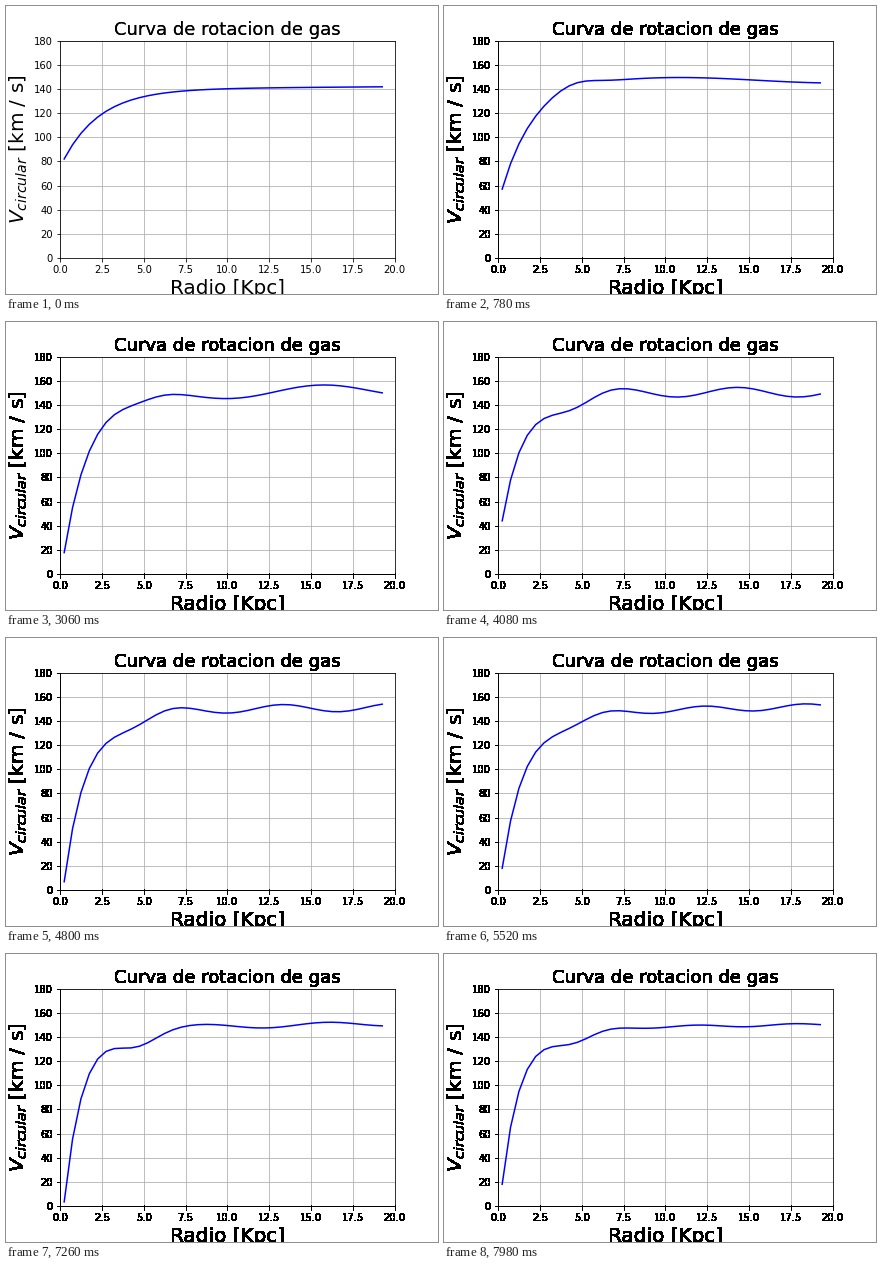
A matplotlib script that plays this animation: 432x288 px, repeating every 8000 ms.

```python
import matplotlib.pyplot as plt
import numpy as np
from matplotlib.animation import FuncAnimation

STEP, LOOP, HOLD = 20, 8000, 60

radius = 0.25 + 0.5 * np.arange(39)

# Key values of the curve's parameters; they glide between these moments (ms).
MOMENTS = [0, 780, 2040, 4080, 5520, 6600, 7980]
TRACKS = dict(
    scale=[2.2, 2.0, 1.55, 1.35, 1.4, 1.15, 1.1],      # radius over which it rises
    level=[141, 148.5, 151, 150.5, 149.7, 149.7, 148.8],
    tilt=[0.1, -0.35, 0.4, 0, 0.3, 0.25, 0.2],
    shoulder=[0, 5, -6, -7, -5, -12, -10],
    height=[0, 1, 6, 4, 2.5, 2.8, 1],                  # outer wave
    crest=[11.5, 11.5, 17, 14.3, 12.3, 14.4, 17.7],
    length=[15, 15, 15, 7.2, 6, 9, 5.8],
)

# The innermost speed swings faster than the rest.
CENTRE_TIMES = [0, 780, 1320, 2040, 2760, 4080, 4680, 5520, 6000, 6600, 7140, 7980]
CENTRE_SPEEDS = [82, 57, 15, 40, 10, 44, 5, 18, 1, 14, 1, 18]


def speed(t):
    p = {name: np.interp(t, MOMENTS, values) for name, values in TRACKS.items()}
    centre = np.interp(t, CENTRE_TIMES, CENTRE_SPEEDS)
    wave = p["height"] * np.cos(2 * np.pi * (radius - p["crest"]) / p["length"])
    outer = p["level"] + p["tilt"] * (radius - 12) + wave
    rise = 1 - np.exp(-(radius - radius[0]) / p["scale"])
    shoulder = p["shoulder"] * np.exp(-((radius - 4.5) / 1.2) ** 2 / 2)
    return centre + (outer - centre) * rise + shoulder


fig, ax = plt.subplots(figsize=(6, 4), dpi=72, facecolor="white")
fig.subplots_adjust(left=0.125, right=0.9, bottom=0.125, top=0.88)
ax.set_xlim(0, 20)
ax.set_ylim(0, 180)
ax.set_xticks(np.arange(0, 20.1, 2.5))
ax.set_yticks(np.arange(0, 181, 20))
ax.set_title("Curva de rotacion de gas", fontsize=18)
ax.set_xlabel("Radio [Kpc]", fontsize=20)
ax.set_ylabel("$V_{circular}$ [km / s]", fontsize=20)
ax.grid(True)

# The fixed parts are drawn once; after the first moment every soft edge
# outside the plot area turns solid black.
fig.canvas.draw()
soft = np.array(fig.canvas.buffer_rgba())[..., :3] / 255
hard = np.floor(soft)
plot_area = np.s_[33:251, 55:392]
hard[plot_area] = soft[plot_area]

ax.axis("off")
backdrop = fig.figimage(soft, zorder=-1)
line, = ax.plot(radius, speed(0), color="blue", lw=1.5)


def update(n):
    t = n * STEP // HOLD * HOLD
    backdrop.set_data(hard if t else soft)
    line.set_ydata(speed(t))
    return backdrop, line


anim = FuncAnimation(fig, update, frames=LOOP // STEP, interval=STEP,
                     repeat=True, repeat_delay=0, blit=False)
plt.show()
```
